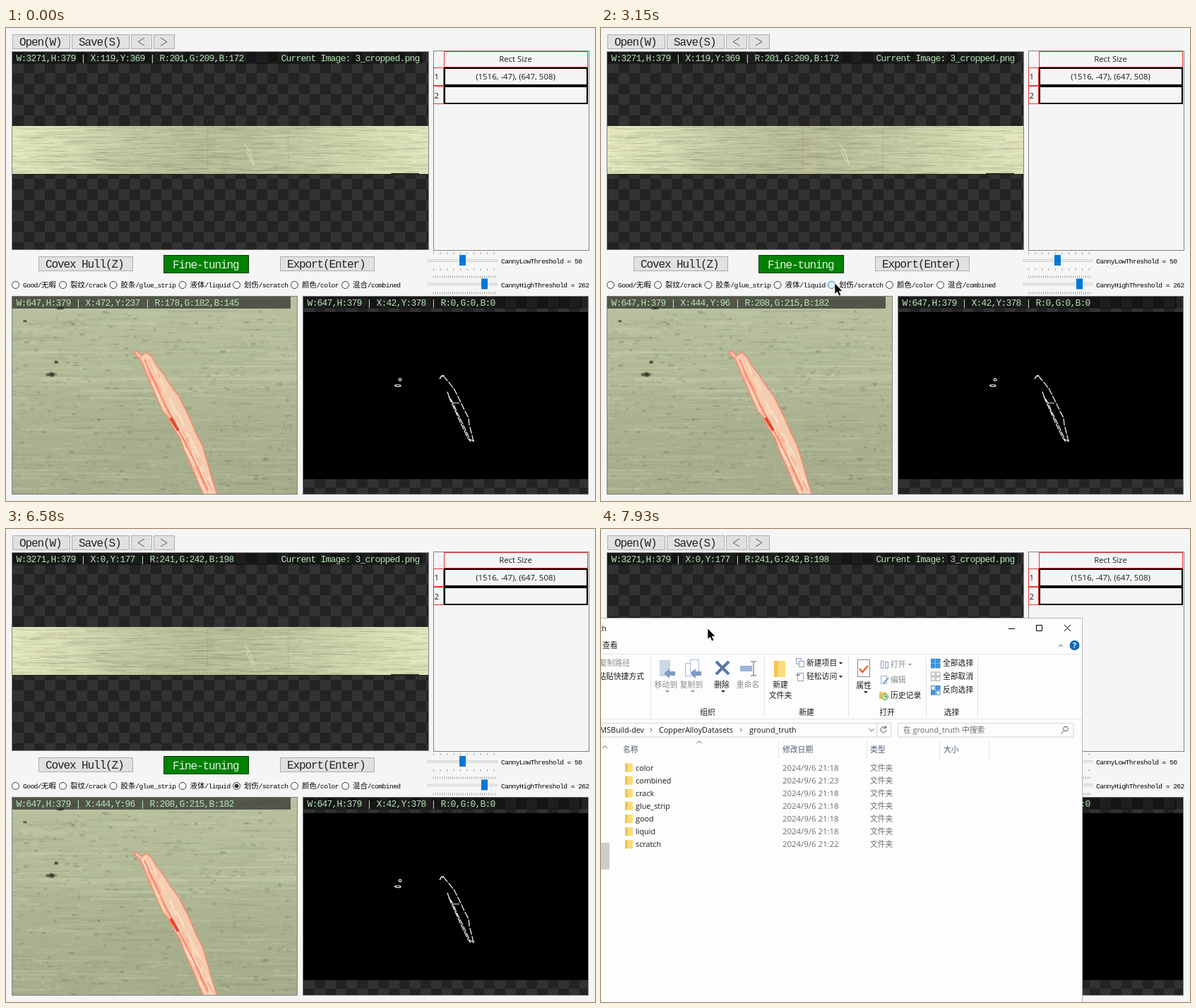
These frames come from a looping animation (834 by 671 pixels, 8 s). An HTML page with a canvas:

```html
<!DOCTYPE html>
<html lang="en">
<head>
<meta charset="utf-8">
<title>Annotation tool</title>
<style>
html, body { margin: 0; width: 834px; height: 671px; overflow: hidden; background: #f5f5f5; }
canvas, svg { position: absolute; left: 0; top: 0; }
text { white-space: pre; }
.btn { fill: #e1e1e1; stroke: #adadad; }
.big { font: 16px "Liberation Mono", monospace; letter-spacing: -1.1px; fill: #222; }
.read { font: 13px "Liberation Mono", monospace; letter-spacing: -.8px; fill: #b4e6b4; }
.cjk { font: 10.4px "Noto Sans CJK SC", "Noto Sans CJK", sans-serif; }
.mono { font: 9.6px "Liberation Mono", monospace; letter-spacing: -.56px; }
.ui { font: 10.8px "Open Sans", "Noto Sans CJK SC", "Noto Sans CJK", sans-serif; fill: #1a1a1a; }
.num { font-size: 11.4px; }
.dim { fill: #8a8a8a; }
.gray { fill: #6d6d6d; }
.head { fill: #4c5b70; }
.mid { text-anchor: middle; }
.end { text-anchor: end; }
.line { fill: none; stroke: #e2e3e4; }
.thin { fill: none; stroke: #555; }

#export, #radio, #dot, #win, #ctrl, #arrow, #cross { animation: 8s step-end infinite; }
#export { animation-name: export; }
#radio { animation-name: radio; }
#dot { animation-name: dot; }
#win { animation-name: show; }
#ctrl { animation-name: focus; }
#arrow { animation-name: arrow; }
#cross { animation-name: cross; }
#drag { animation: drag 8s linear infinite; }
#cursor { animation: move 8s linear infinite; }

@keyframes export {
  0% { fill: #e1e1e1; stroke: #adadad; }
  49% { fill: #e5f1fb; stroke: #0078d7; }
  58.5% { fill: #cce4f7; stroke: #005499; }
  59.5% { fill: #e5f1fb; stroke: #0078d7; }
  68.1% { fill: #e1e1e1; stroke: #adadad; }
}
@keyframes radio {
  0% { fill: #fff; stroke: #333; }
  29.5% { fill: #e8f4ff; stroke: #0078d7; }
  42.5% { fill: #fff; stroke: #333; }
}
@keyframes dot {
  0% { visibility: hidden; }
  39.8% { visibility: visible; fill: #0078d7; }
  42.5% { visibility: visible; fill: #333; }
}
@keyframes show { 0% { visibility: hidden; } 88.12% { visibility: visible; } }
@keyframes focus { 0% { stroke: #8c8c8c; } 97.5% { stroke: #000; } }
@keyframes drag {
  0%, 97.5% { transform: translate(-43px, 3px); }
  99.1%, 100% { transform: none; }
}
@keyframes arrow {
  0% { visibility: hidden; }
  3.375% { visibility: visible; }
  3.9% { visibility: hidden; }
  25.8% { visibility: visible; }
  82.25% { visibility: hidden; }
  91.25% { visibility: visible; }
}
@keyframes cross {
  0% { visibility: hidden; }
  3.9% { visibility: visible; }
  25.8% { visibility: hidden; }
}
@keyframes move {
  0%, 3.375% { transform: translate(416px, 631px); animation-timing-function: ease-out; }
  6.125%, 9.625% { transform: translate(381px, 519px); }
  11.125%, 15.75% { transform: translate(381px, 508px); animation-timing-function: ease-in-out; }
  22.6%, 22.9% { transform: translate(369px, 401px); }
  25.6%, 26% { transform: translate(370px, 391px); animation-timing-function: ease-out; }
  30%, 41.875% { transform: translate(331px, 362px); animation-timing-function: ease-in-out; }
  51.6%, 52.25% { transform: translate(419px, 337px); }
  55.1%, 67.5% { transform: translate(420px, 336px); animation-timing-function: ease-out; }
  72.7%, 73.9% { transform: translate(268px, 306px); }
  77.4%, 77.6% { transform: translate(255px, 260px); }
  82.25% { transform: translate(-14px, 167px); }
  91.24% { transform: translate(-14px, 142px); }
  91.25% { transform: translate(0, 142px); animation-timing-function: ease-out; }
  95.75%, 97.5% { transform: translate(87px, 142px); }
  99.1%, 100% { transform: translate(151px, 141px); }
}
</style>
</head>
<body>
<canvas id="scene" width="834" height="671"></canvas>
<svg id="ui" width="834" height="671" viewBox="0 0 834 671"></svg>
<script>
const ctx = document.getElementById('scene').getContext('2d');
let seed = 11;
const rnd = () => (seed = (seed * 16807) % 2147483647) / 2147483647;
const span = (a, b) => a + (b - a) * rnd();

function box(color, x, y, w, h) {
  ctx.fillStyle = color;
  ctx.fillRect(x, y, w, h);
}
function inside(x, y, w, h, paint) {
  ctx.save();
  ctx.beginPath();
  ctx.rect(x, y, w, h);
  ctx.clip();
  paint();
  ctx.restore();
}
function checker(x, y, w, h) {
  const s = 15;
  inside(x, y, w, h, () => {
    box('#232323', x, y, w, h);
    for (let r = 0; r * s < h; r++)
      for (let c = (r + 1) % 2; c * s < w; c += 2) box('#323232', x + c * s + 1, y + r * s + 1, s, s);
  });
}
function streaks(n, x, y, w, h, len, thick, alpha, tones) {
  for (let i = 0; i < n; i++) {
    const l = span(len / 8, len);
    box(`rgba(${tones[i % tones.length]},${span(.03, alpha)})`,
      span(x - l, x + w), span(y, y + h), l, span(.6, thick));
  }
}
function trace(d, color, width, dash = []) {
  ctx.strokeStyle = color;
  ctx.lineWidth = width;
  ctx.setLineDash(dash);
  ctx.stroke(new Path2D(d));
  ctx.setLineDash([]);
}
function fade(x0, y0, x1, y1, colors) {
  const g = ctx.createLinearGradient(x0, y0, x1, y1);
  colors.forEach((c, i) => g.addColorStop(i / (colors.length - 1), c));
  return g;
}

// Overview
checker(9, 33, 590, 282);
inside(9, 139, 590, 69, () => {
  box(fade(9, 0, 599, 0, ['#e6eabf', '#d9ddb5', '#c4c9a2', '#bbc09a', '#bdc39c', '#c9cfa7', '#d8ddb4', '#e4e8c0']), 9, 139, 590, 69);
  streaks(1500, 9, 139, 590, 69, 45, 1.1, .2, ['85,90,65', '240,244,208', '105,110,80']);
  streaks(160, 9, 139, 590, 69, 130, 1, .16, ['70,75,52']);
  box('#22241a', 9, 207, 590, 1);
  box('#22241a', 545, 206, 40, 1);
  trace('M337 164Q347 174 351 194M340 174Q344 182 348 190', '#e6eacc', 1);
});
trace('M285.5 130.5H399.5V221.5H285.5Z', 'rgba(200,50,40,.25)', 1, [2, 2]);
box('rgba(0,0,0,.4)', 9, 33, 580, 18);

// Enlarged crop
inside(9, 381, 404, 281, () => {
  box(fade(0, 381, 0, 661, ['#b9c19f', '#b2ba98', '#aab190', '#a6ad8c']), 9, 381, 404, 281);
  streaks(70, 9, 395, 404, 130, 220, 5, .3, ['208,214,184']);
  streaks(700, 9, 381, 404, 281, 90, 3, .2, ['212,218,188', '130,138,110']);
  streaks(1100, 9, 400, 404, 261, 8, 4, .3, ['88,96,72', '125,133,104', '205,211,180']);
  for (const [x, y, w, h] of [[67, 471, 7, 6], [56, 489, 17, 6], [62, 487, 6, 9], [24, 414, 6, 4], [70, 395, 12, 5]])
    for (let i = 0; i < 4; i++) box('rgba(50,56,42,.32)', x + span(0, w / 3), y + span(0, h / 3), w * .7, h * .6);

  const scar = new Path2D('M181 460L186 459 192 465 199 460 207 467 213 478 223 491 236 511 245 523 254 541 260 553 270 577 278 592 284 612 289 630 294 648 299 662H280L272 645 264 625 252 598 247 583 237 567 230 553 222 543 215 528 206 507 199 492 194 478 189 469Z');
  ctx.fillStyle = '#f4ccb0';
  ctx.fill(scar);
  ctx.save();
  ctx.clip(scar);
  for (let i = 0; i < 130; i++) {
    const k = rnd(), x = 186 + 100 * k + span(-10, 16), y = 462 + 200 * k, l = span(6, 20);
    trace(`M${x} ${y}l${l * .5} ${l}`, `rgba(${['252,232,205', '250,165,138', '248,222,190'][i % 3]},.55)`, span(1, 4));
  }
  trace('M196 470L212 506 226 536 240 562 262 604 286 656', 'rgba(248,100,72,.6)', 2.5);
  trace('M233 553L244 571', '#e8452e', 4);
  ctx.restore();
  ctx.lineJoin = 'round';
  ctx.strokeStyle = 'rgba(250,125,98,.65)';
  ctx.lineWidth = 2;
  ctx.stroke(scar);
});
box('rgba(20,20,20,.62)', 9, 381, 394, 17);

// Edge map
checker(421, 381, 404, 280);
box('rgba(0,0,0,.4)', 421, 381, 394, 17);
box('#000', 421, 403, 404, 237);
trace('M614 498l2-4 3-1-3 4m3-4 4 5 6 7 5 7M634 511l5 10 6 12 4 9 6 11 1 10 3 11 3 13', '#fff', 1.2, [10, 2]);
trace('M625 516l2 6 6 10 5 12 7 14 7 15 5 11 6 2M627 523l9 20 9 20 9 19 4 5M634 532h8', '#fff', 1.2, [9, 1.5]);
trace('M556 499a2 1.6 0 1 1 4 0a2 1.6 0 1 1-4 0M550 507q5-2 9 0l0 1q-5 2-9-1', '#fff', 1.1);

// Interface
const text = (x, y, s, cls, extra = '') => `<text x="${x}" y="${y}" class="${cls}" ${extra}>${s}</text>`;
const rect = (x, y, w, h, fill, stroke = 'none', extra = '') =>
  `<rect x="${x}" y="${y}" width="${w}" height="${h}" fill="${fill}" stroke="${stroke}" ${extra}/>`;
const path = (d, cls = 'thin', extra = '') => `<path d="${d}" class="${cls}" ${extra}/>`;
const button = (x, y, w, h, label, id = '') =>
  `<rect x="${x}.5" y="${y}.5" width="${w}" height="${h}" class="btn" ${id && `id="${id}"`}/>` + text(x + 10, y + 16, label, 'big');

const radios = [[13.5, 'Good/无暇'], [80.5, '裂纹/crack'], [152, '胶条/glue_strip'], [250, '液体/liquid'],
  [326.5, '划伤/scratch'], [408.5, '颜色/color'], [480.5, '混合/combined']];
const radio = ([x, label], i) =>
  `<circle cx="${x}" cy="364.5" r="5" fill="#fff" stroke="#333" ${i == 4 ? 'id="radio"' : ''}/>` +
  (i == 4 ? `<circle id="dot" cx="${x}" cy="364.5" r="3"/>` : '') +
  text(x + 10.5, 368, label.replace(/[\w/]+/g, m => `<tspan class="mono">${m}</tspan>`), 'cjk');

function slider(y, thumb, step, label) {
  let ticks = '';
  for (let x = 605.5; x < 693; x += step) ticks += `M${x} ${y - 12}v3M${x} ${y + 11}v3`;
  return path(ticks, 'thin', 'stroke-opacity=".5"') + rect(597.5, y - 1.5, 98, 3, '#e7eaea', '#d6d6d6') +
    rect(thumb, y - 8, 9, 15, '#0078d7') + text(701, y + 4, label, 'mono');
}

const frame = (x, y, w, h) => rect(x, y, w, h, 'none', '#828282');
const redCell = (x, y, w, h) => rect(x, y, w, h, 'none', '#f03030');
const row = y => redCell(605.5, y + .5, 14, 25) + rect(621, y + 1, 202, 24, 'none', '#000', 'stroke-width="2"');
const app =
  button(9, 9, 81, 20, 'Open(W)') + button(93, 9, 81, 20, 'Save(S)') +
  button(177, 9, 29, 20, '') + button(209, 9, 29, 20, '') +
  path('M196 14l-9 5.5 9 5.5M219 14l9 5.5-9 5.5') +
  frame(8.5, 33.5, 590, 281) + frame(8.5, 380.5, 404, 281) + frame(420.5, 380.5, 404, 281) + frame(605.5, 32.5, 220, 283) +
  redCell(620.5, 33.5, 203, 22) + row(56) + row(82) +
  text(721.5, 48, 'Rect Size', 'ui num mid') + text(721.5, 73, '(1516, -47), (647, 508)', 'ui num mid') +
  text(606.5, 73, '1', 'ui num') + text(606.5, 100, '2', 'ui num') +
  button(46, 324, 133, 20, 'Covex Hull(Z)') + button(388, 324, 133, 20, 'Export(Enter)', 'export') +
  rect(223.5, 322.5, 120, 25, '#008000', '#003c00') + text(236, 341, 'Fine-tuning', 'big', 'style="fill:#e6f5e6"') +
  radios.map(radio).join('') +
  slider(330, 642, 9.5, 'CannyLowThreshold = 50') + slider(363.5, 673, 3, 'CannyHighThreshold = 262') +
  text(14.5, 47, '', 'read', 'id="top"') + text(14.5, 394, '', 'read', 'id="crop"') +
  text(389.5, 47, 'Current Image: 3_cropped.png', 'read') +
  text(426.5, 394, 'W:647,H:379 | X:42,Y:378 | R:0,G:0,B:0', 'read');

// File window
const labels = [
  ['ui dim end', [41, 194, '复制路径']],
  ['ui end', [61, 213, '粘贴快捷方式'], [8, 145, 'ground_truth'], [61, 288.5, 'MSBuild-dev']],
  ['ui dim mid', [92, 225, '移动到'], [128, 225, '复制到'], [208, 225, '重命名']],
  ['ui mid', [171, 225, '删除'], [254, 225, '新建'], [254, 240, '文件夹'], [372, 226, '属性'],
    [151, 264, '组织'], [291, 264, '新建'], [405, 264, '打开'], [496.5, 264, '选择']],
  ['ui', [2, 169, '查看'], [291, 194, '新建项目'], [291, 213, '轻松访问'], [410, 240, '历史记录'],
    [484, 194, '全部选择'], [484, 213, '全部取消'], [484, 232, '反向选择'], [82, 288.5, 'CopperAlloyDatasets'], [210, 288.5, 'ground_truth']],
  ['ui dim', [410, 196, '打开'], [410, 218, '编辑']],
  ['ui gray', [428, 289, '在 ground_truth 中搜索']],
  ['ui head', [31, 317, '名称'], [257, 317, '修改日期'], [381, 317, '类型'], [485, 317, '大小']],
].map(([cls, ...items]) => items.map(([x, y, s]) => text(x, y, s, cls)).join('')).join('');

const folder = (x, y, w, h) => rect(x, y, w, h, '#fbdc7c') + rect(x, y, w * .35, h, '#f3c552');
const rows = ['color', 'combined', 'crack', 'glue_strip', 'good', 'liquid', 'scratch'].map((name, i) => {
  const y = 342.5 + 18.15 * i, min = { combined: 23, scratch: 22 }[name] || 18;
  return folder(34, y - 10, 11, 12) + text(49, y, name, 'ui') +
    text(257, y, `2024/9/6 21:${min}`, 'ui num gray') + text(381, y, '文件夹', 'ui gray');
}).join('');

const page = (x, y, w, h, c = '#8aa0c0') => rect(x, y, w, h, '#fff', c);
const moveArrow = x => path(`M${x} 205l8-7v4h8v6h-8v4z`, '', 'fill="#7f9ac4"');
const grid = (y, fills, edge) => fills.map((f, i) => rect(467.5 + i % 2 * 7, y + (i >> 1) * 7, 5.5, 5.5, f, edge)).join('');
const blue = '#3b9be6';
const icons =
  rect(83, 186, 15, 23, '#ccd7e8') + moveArrow(89) +
  page(119.5, 190.5, 13, 18, '#a9b9d2') + page(126.5, 185.5, 12, 17, '#a9b9d2') + moveArrow(126) +
  path('M163 188l18 18M181 188l-18 18', '', 'stroke="#5b76a3" stroke-width="4"') +
  rect(197, 194, 17, 8, '#9db4d8') + path('M212 188h8M212 208h8M216 188v20', '', 'stroke="#8093b0" stroke-width="1.5"') +
  folder(245, 187, 16, 23) +
  page(276.5, 183.5, 7, 8) + page(280.5, 187.5, 7, 8) + page(278.5, 204.5, 8, 11) + path('M276 207h6', '', 'stroke="#345"') +
  page(363.5, 185.5, 17, 24, '#888') + path('M366 198l4 5 8-9', '', 'fill="none" stroke="#f0602a" stroke-width="2.5"') +
  page(396.5, 187.5, 3, 10) + page(402.5, 188.5, 4, 9) + page(396.5, 208.5, 8, 11, '#9bb3d2') + path('M400 219l7-8', '', 'stroke="#7fa3d2" stroke-width="2"') +
  folder(394, 231, 10, 10) + '<circle cx="402" cy="238" r="4.5" fill="#cdebc0" stroke="#3f9b3f"/>' + path('M402 235v3h3') +
  grid(184.5, [blue, blue, blue, blue], '#2c84cc') + grid(203, ['#fff', '#fff', '#fff', '#fff'], '#aaa') + grid(222.5, ['#fff', blue, blue, '#fff'], '#2c84cc') +
  path('M91 229h6l-3 3zM127 229h6l-3 3zM435 191h5l-2.5 3z', '', 'fill="#999"') +
  path('M170 229h6l-3 3zM372 230h6l-3 3zM337 189h5l-2.5 3zM337 208h5l-2.5 3z', '', 'fill="#222"');

const win = '<g id="win"><g id="drag">' +
  rect(-60, 127, 741, 560, '#fdfdfd') + path('M-60 126.5H681.5V680', '', 'fill="none" stroke="#b5b5b5"') +
  path('M-60 177.5H681M-60 269.5H681M70.5 181v86M231.5 181v86M350.5 181v86M460.5 181v86M533.5 181v86', 'line') +
  path('M251.5 300v26M376.5 300v26M479.5 300v26M549.5 300v26', 'line') +
  path('M-60 275.5H410.5V295H-60M390.5 275v20M420.5 275.5H669V295H420.5Z', 'line', 'style="stroke:#d5d5d5"') +
  `<g id="ctrl" fill="none">${path('M577 141.5h9M616.5 136.5h8v8h-8zM656 136l9 9M665 136l-9 9', '')}</g>` +
  path('M648 167l3-3 3 3M379.5 283.5l3.5 3.5 3.5-3.5M69.5 282.5l2.5 2.5-2.5 2.5M197 282.5l2.5 2.5-2.5 2.5M135.5 304l3.5-3 3.5 3M2 311l3.5-3.5 3.5 3.5') +
  path('M403 282a4 4 0 1 0 1 3M403.5 279v3.5h-3.5M655.5 286.5l-4 4') + '<circle cx="658" cy="283.5" r="3.3" class="thin"/>' +
  '<circle cx="670.5" cy="165" r="7" fill="#0f67b8"/>' + text(670.5, 169, '?', 'ui mid', 'style="fill:#fff;font-weight:700"') +
  rect(-5, 445, 17, 38, '#cdcdcd') + labels + icons + rows + '</g></g>';

const cursor = '<g id="cursor">' +
  path('M0 0V15.5L3.5 12.2 6 18 8.7 16.8 6.2 11.2H11Z', '', 'id="arrow" fill="#000" stroke="#fff" stroke-width=".7"') +
  path('M-7 .5H8M.5-7V8', '', 'id="cross" stroke="#111"') + '</g>';

document.getElementById('ui').innerHTML = app + win + cursor;

// Readouts: time, x, y, r, g, b
const cropKeys = [[270, 472, 237, 178, 182, 145], [490, 449, 184, 190, 195, 160], [770, 449, 184, 190, 195, 160],
  [890, 448, 176, 172, 178, 143], [1260, 448, 176, 172, 178, 143], [1808, 440, 98, 185, 192, 158],
  [1835, 440, 98, 185, 192, 158], [2050, 444, 96, 208, 215, 182]];
const topKeys = [[6399, 119, 369, 201, 209, 172], [6400, 526, 379, 201, 205, 165], [6550, 0, 177, 241, 242, 198]];

function readout(keys, t) {
  const n = keys.findIndex(k => k[0] > t);
  const b = n < 0 ? keys[keys.length - 1] : keys[n], a = n > 0 ? keys[n - 1] : b;
  const p = a === b ? 0 : (t - a[0]) / (b[0] - a[0]);
  const [, x, y, r, g, bl] = a.map((v, i) => Math.round(v + (b[i] - v) * p));
  return `X:${x},Y:${y} | R:${r},G:${g},B:${bl}`;
}
const topText = document.getElementById('top'), cropText = document.getElementById('crop');
const start = performance.now();
function tick() {
  const t = (performance.now() - start) % 8000;
  topText.textContent = 'W:3271,H:379 | ' + readout(topKeys, t);
  cropText.textContent = 'W:647,H:379 | ' + readout(cropKeys, t);
  requestAnimationFrame(tick);
}
tick();
</script>
</body>
</html>
```
